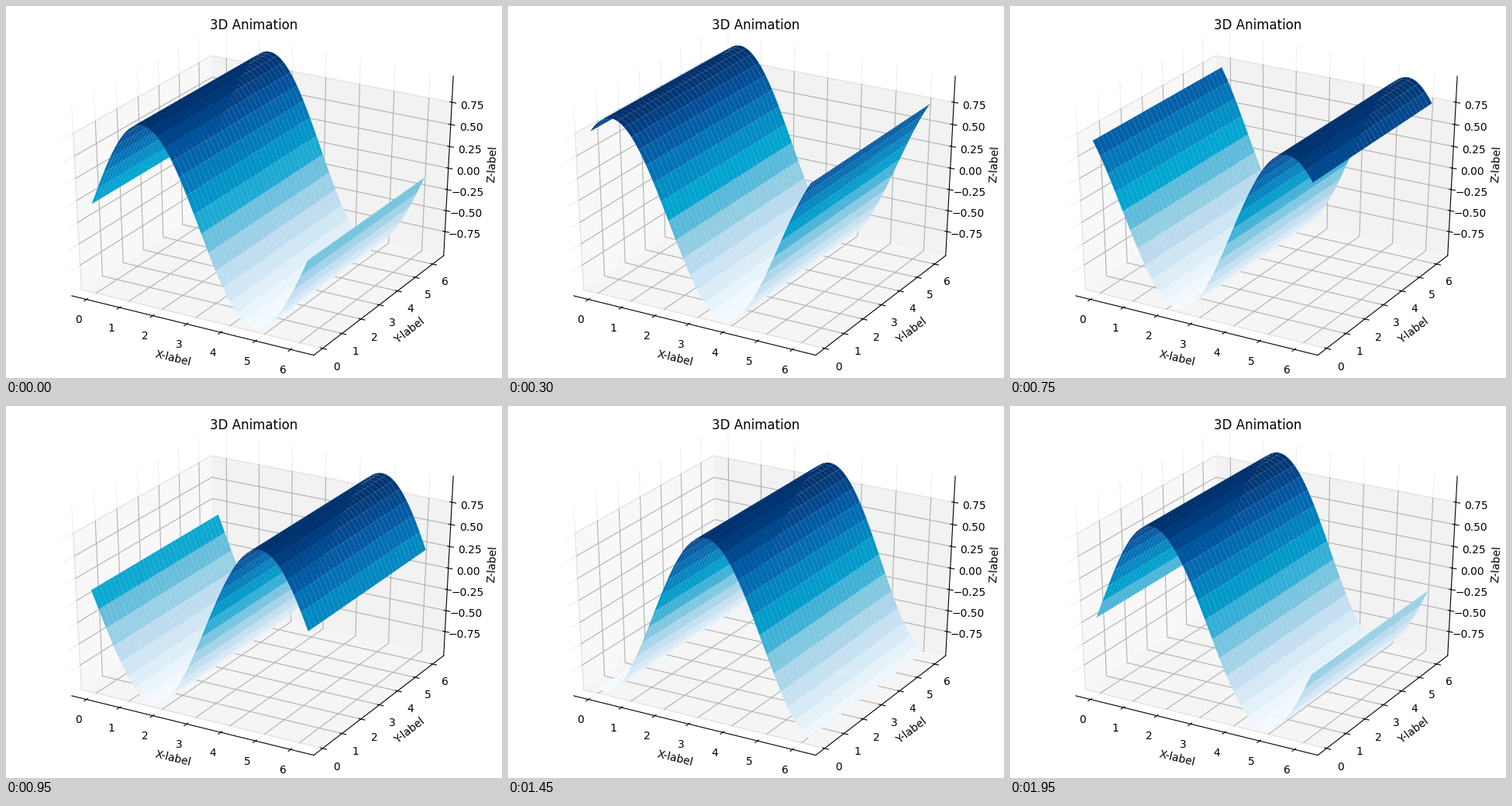
Write a matplotlib script that moves like this. It is 640 px wide and 480 px high and loops after 2 s.

```python
import numpy as np
import matplotlib.pyplot as plt
from matplotlib.animation import FuncAnimation
from matplotlib.colors import ListedColormap
from matplotlib.lines import Line2D
from matplotlib.patches import Polygon
from mpl_toolkits.mplot3d import proj3d

FRAMES = 40
GRID, EDGE, FAINT = "#b0b0b0", "#dedede", "#efefef"


def vivid_blues():
    """Blues with the red channel pulled down in the midtones."""
    rgb = plt.get_cmap("Blues")(np.linspace(0, 1, 256))[:, :3] ** 2.2
    rgb[:, 0] = 1.43 * rgb[:, 0] - 0.43 * rgb[:, 1]
    return ListedColormap(np.clip(rgb, 0, 1) ** (1 / 2.2))


CMAP = vivid_blues()
axis = np.arange(0, 2 * np.pi, 0.1)
X, Y = np.meshgrid(axis, axis)

fig = plt.figure(figsize=(6.4, 4.8), dpi=100, facecolor="white")
ax = fig.add_axes([0, 0, 1, 1], projection="3d")
ax.apply_aspect = lambda position=None: None  # let the cube fill the stage
ax.set_box_aspect((1, 1, 1), zoom=np.sqrt(3) / 1.8294640721620434)
ax.viewLim.intervalx = ax.viewLim.intervaly = (-0.095, 0.09)
ax.view_init(elev=30, azim=-60)

span = axis[-1]
pad = span * (0.05 + 1.1 / 48)
lo, hi = -pad, span + pad
z_hi = 0.9996 * 25 / 24
z_lo = -z_hi
z_ticks = np.linspace(-0.75, 0.75, 7)
z_top = z_ticks[-1]

ax.set_xlim(lo, hi)
ax.set_ylim(lo, hi)
ax.set_zlim(z_lo, z_hi)
ax.set_xticks(range(7))
ax.set_yticks(range(7))
ax.set_zticks(z_ticks)
ax.set_xlabel("X-label")
ax.set_ylabel("Y-label")
ax.set_zlabel("Z-label")
fig.text(0.5, 449.9 / 480, "3D Animation", fontsize=12,
         ha="center", va="baseline")

ax.patch.set_visible(False)
ax.grid(False)
for side in (ax.xaxis, ax.yaxis, ax.zaxis):
    side.pane.set_visible(False)

M = ax.get_proj()


def flat(*points):
    x, y, _ = proj3d.proj_transform(*np.array(points, float).T, M)
    return np.column_stack([x, y])


def pane(shade, *corners):
    fig.add_artist(Polygon(flat(*corners), facecolor=str(shade), alpha=0.5,
                           linewidth=0, transform=ax.transData, zorder=-3))


def line(color, *points):
    x, y = flat(*points).T
    fig.add_artist(Line2D(x, y, color=color, linewidth=0.8,
                          transform=ax.transData,
                          zorder=-1 if color == GRID else -2))


def draw_box():
    pane(0.95, (lo, 0, z_lo), (lo, hi, z_lo), (lo, hi, z_top), (lo, 0, z_top))
    pane(0.9, (lo, hi, z_lo), (hi, hi, z_lo), (hi, hi, z_top), (lo, hi, z_top))
    pane(0.925, (lo, 0, z_lo), (hi, 0, z_lo), (hi, hi, z_lo), (lo, hi, z_lo))
    for v in range(7):
        line(FAINT, (v, lo, z_lo), (v, 0, z_lo))
        line(GRID, (v, 0, z_lo), (v, hi, z_lo), (v, hi, z_top))
        line(FAINT, (v, hi, z_top), (v, hi, z_hi))
        line(GRID if v else EDGE,
             (hi, v, z_lo), (lo, v, z_lo), (lo, v, z_top))
        line(FAINT, (lo, v, z_top), (lo, v, z_hi))
    for z in z_ticks:
        line(FAINT, (lo, lo, z), (lo, 0, z))
        line(GRID if z < z_top else EDGE,
             (lo, 0, z), (lo, hi, z), (hi, hi, z))


def update(i):
    for c in list(ax.collections):
        c.remove()
    wave = np.sin(X + 2 * np.pi * i / FRAMES)
    return [ax.plot_surface(X, Y, wave, cmap=CMAP, vmin=-1, vmax=1)]


draw_box()
anim = FuncAnimation(fig, update, frames=FRAMES, interval=50,
                     repeat=True, repeat_delay=0, blit=False)
plt.show()
```
